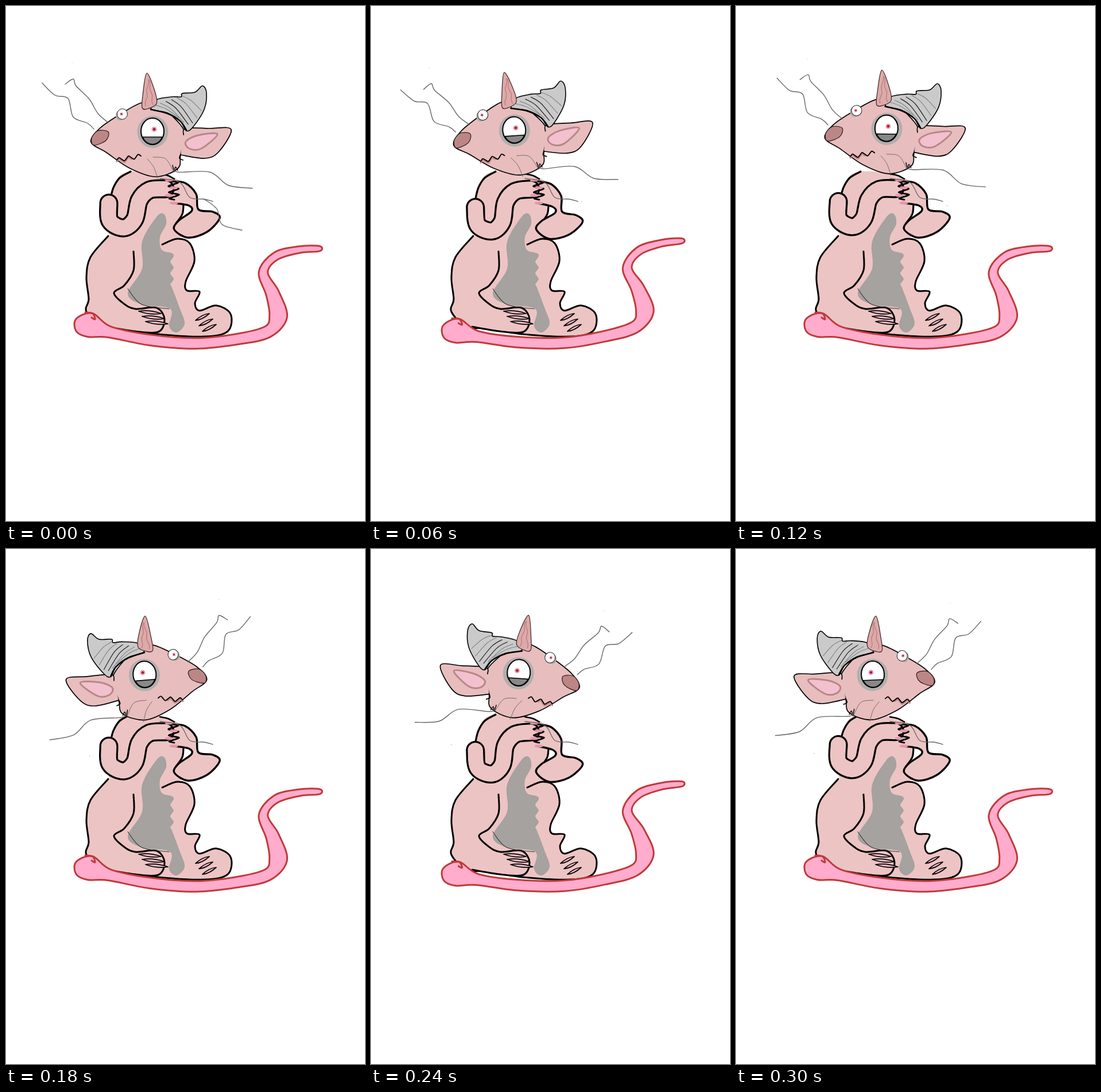
Animation, 625 px wide and 896 px high, one loop 360 ms. Source, as an HTML page with a canvas:

```html
<!DOCTYPE html>
<html lang="en">
<head>
<meta charset="utf-8">
<title>Nervous rat</title>
<style>
html, body { margin: 0; width: 100%; height: 100%; overflow: hidden; background: #fff; }
canvas { display: block; }
</style>
</head>
<body>
<canvas id="stage" width="625" height="896"></canvas>
<script>
const ctx = document.getElementById('stage').getContext('2d');
const SKIN = '#edc4c4', FACE = '#e8bdbd', INK = '#000', HAIR = '#666', GREY = '#888';
const STEP = 60;
const EYE = { x: 258, y: 214.5 };

// Where the eye sits and how far the head turns, facing left three times, then right
const HEADS = [
  [258, 214.5, 0], [252, 212, -4.2], [265, 209.3, 1],
  [238, 215, -5], [254.5, 211.5, 4.1], [235, 214.7, -2.5]
];

// The body repeats every three steps (degrees)
const BODIES = [
  { left: 0, right: 0, tail: 0 },
  { left: -4, right: 5, tail: -3.4 },
  { left: 1.5, right: 0, tail: 0 }
];

const mix = (a, b, u) => a + (b - a) * u;

// Smooth curve through a run of x,y pairs
function curve(pts, closed) {
  const n = pts.length / 2;
  const at = i => {
    i = closed ? (i + n) % n : Math.max(0, Math.min(n - 1, i));
    return [pts[2 * i], pts[2 * i + 1]];
  };
  ctx.beginPath();
  ctx.moveTo(pts[0], pts[1]);
  for (let i = 0; i < (closed ? n : n - 1); i++) {
    const [a, b, c, d] = [at(i - 1), at(i), at(i + 1), at(i + 2)];
    ctx.bezierCurveTo(b[0] + (c[0] - a[0]) / 6, b[1] + (c[1] - a[1]) / 6,
      c[0] - (d[0] - b[0]) / 6, c[1] - (d[1] - b[1]) / 6, c[0], c[1]);
  }
  if (closed) ctx.closePath();
}

function paint(fill, ink, width) {
  if (fill) { ctx.fillStyle = fill; ctx.fill(); }
  if (ink) { ctx.strokeStyle = ink; ctx.lineWidth = width; ctx.stroke(); }
}

function shape(pts, fill, ink, width) { curve(pts, true); paint(fill, ink, width); }
function open(pts, fill, ink, width) { curve(pts, false); paint(fill, ink, width); }
function line(pts, ink, width) { open(pts, null, ink, width); }

function oval(x, y, rx, ry, fill, ink, width) {
  ctx.beginPath();
  ctx.ellipse(x, y, rx, ry, 0, 0, 7);
  paint(fill, ink, width);
}

// Points of a sine ripple laid along a straight line
function ripple(x1, y1, x2, y2, amp, waves) {
  const pts = [], steps = Math.ceil(waves * 4);
  const len = Math.hypot(x2 - x1, y2 - y1);
  for (let i = 0; i <= steps; i++) {
    const u = i / steps, off = amp * Math.sin(2 * Math.PI * waves * u) / len;
    pts.push(mix(x1, x2, u) + (y2 - y1) * off, mix(y1, y2, u) - (x2 - x1) * off);
  }
  return pts;
}

// Closed outline around a spine; half(i, u) is the half width at each point
function tube(spine, half) {
  const n = spine.length / 2, near = [], far = [];
  for (let i = 0; i < n; i++) {
    const a = 2 * Math.max(0, i - 1), b = 2 * Math.min(n - 1, i + 1);
    const dx = spine[b] - spine[a], dy = spine[b + 1] - spine[a + 1];
    const k = half(i, i / (n - 1)) / Math.hypot(dx, dy);
    const x = spine[2 * i], y = spine[2 * i + 1];
    near.push(x + dy * k, y - dx * k);
    far.unshift(x - dy * k, y + dx * k);
  }
  return near.concat(far);
}

function toes(x, y, length, rise, dx, dy) {
  for (let i = 0; i < 3; i++) {
    const x1 = x + i * dx, y1 = y + i * dy, x2 = x1 + length, y2 = y1 + rise;
    const mx = (x1 + x2) / 2, my = (y1 + y2) / 2;
    ctx.beginPath();
    ctx.moveTo(x1, y1);
    ctx.quadraticCurveTo(mx, my - 5, x2, y2);
    ctx.quadraticCurveTo(mx, my + 5, x1, y1);
    paint('#f3bccb', INK, 1.7);
  }
}

function turned(x, y, deg, draw) {
  ctx.save();
  ctx.translate(x, y);
  ctx.rotate(deg * Math.PI / 180);
  ctx.translate(-x, -y);
  draw();
  ctx.restore();
}

function body() {
  shape([217, 288, 188, 315, 180, 398, 240, 425, 300, 408, 307, 362, 300, 303], SKIN);
  open([178, 400, 147, 437, 140, 472, 144, 510, 140, 532, 168, 561, 195, 560, 265, 571,
    345, 575, 386, 566, 391, 536, 366, 521, 337, 530, 329, 517, 337, 497, 315, 495,
    313, 479, 328, 444, 320, 413, 298, 405, 272, 415], SKIN, INK, 3);
  line([217, 288, 198, 299, 187, 316, 182, 335], INK, 3.2);
  line([309, 345, 307, 362, 296, 378], INK, 3.2);
  line([268, 292, 282, 295, 293, 301], INK, 2.6);
  open([222, 427, 222, 460, 206, 486, 188, 499, 204, 517, 225, 527, 262, 525, 276, 545,
    265, 567, 225, 566, 176, 558], SKIN, INK, 3);

  shape([275, 362, 279, 379, 268, 402, 271, 424, ...ripple(289, 430, 289, 490, 3, 3),
    303, 527, 311, 553, 297, 568, 284, 557, 286, 527, 236, 519, 212, 500, 237, 457,
    237, 410, 262, 367], '#a5a29f');
  line([212, 492, 236, 519, 284, 527], '#333', 1.1);

  toes(231, 531, 39, 4, 6, 9);
  toes(330, 547, 24, -12, 6, 9.5);
}

function tail() {
  const bump = (i, at, size, spread) => size * Math.exp(-(((i - at) / spread) ** 2));
  const half = (i, u) => 9.3 - 5 * u ** 4 + bump(i, 0.9, 12, 0.6) + bump(i, 7.2, 7, 0.9);
  const spine = [122, 555, 146, 555, 180, 567, 250, 581, 330, 587, 400, 580, 455, 567,
    474, 540, 464, 500, 448, 463, 470, 435, 510, 424, 546, 422];
  shape(tube(spine, half), '#ffaccd', '#c03a3a', 3);
  line([138, 533, 151, 535, 155, 545, 149, 542], '#c03a3a', 3);
}

// A limb of even thickness is one fat stroke on another
function leftArm() {
  const spine = [277, 318, 250, 320, 232, 338, 224, 371, 205, 386, 181, 374, 179, 343];
  line(spine, INK, 33);
  line(spine, SKIN, 26.5);
}

function rightArm() {
  open([288, 305, 312, 308, 331, 327, 335, 354, 360, 358, 372, 369, 350, 393, 317, 403,
    293, 389, 300, 374, 323, 357, 318, 347, 292, 343], SKIN, INK, 3.4);
}

function hands() {
  line(ripple(291, 305, 293, 337, 9, 3), INK, 2.8);
  for (let i = 0; i < 4; i++) oval(284 + 8 * (i % 2), 303 + 13.3 * i, 7.5, 2.6, '#e497ad');
}

function hat() {
  shape([262, 163, 289, 158, 305, 158, 307, 152, 329, 150, 342, 139, 349, 151, 345, 180,
    326, 210, 314, 217, 303, 200, 281, 186, 253, 179], '#cacaca', INK, 1.6);
  line([252, 180, 281, 187, 303, 200, 314, 216], INK, 2.6);
  for (let i = 0; i < 6; i++) {
    const u = i / 5, fold = i === 2 || i === 3;
    const x1 = mix(259, 308, u), y1 = mix(172, 157, u), x2 = mix(302, 340, u);
    const y2 = mix(195, 182, u) + 17 * Math.sin(Math.PI * u);
    line([x1, y1, mix(x1, x2, 0.45), mix(y1, y2, 0.3), x2, y2], fold ? '#222' : GREY, 1.2);
  }
}

function ear() {
  open([309, 224, 313, 213, 355, 213, 392, 215, 370, 254, 346, 265, 304, 259], FACE, INK, 1.7);
  shape([368, 223, 334, 225, 313, 236, 319, 248, 340, 248], '#f3c0d0', '#b98787', 3);
}

function horn() {
  shape([237, 177, 238, 156, 245, 117, 259, 148, 262, 170, 246, 179], '#dda9a9', '#3a2525', 1.2);
  line(ripple(243, 174, 248, 128, 1.2, 2), '#b57676', 1.1);
  line(ripple(256, 172, 249, 128, 1.2, 2), '#b57676', 1.1);
}

function pupil(x, y, r) {
  oval(x, y, r, r, '#eba0b2');
  oval(x, y, r / 2, r / 2, '#a01838');
}

function eyes() {
  oval(199, 190, 8, 9, '#a9a9a9');
  oval(202.5, 188, 9, 9.2, '#fff', '#222', 1);
  pupil(201, 188, 2.8);

  oval(255.5, 219, 27, 28, '#b3aeae');
  oval(255, 218, 20, 23, '#fff', INK, 2);
  ctx.beginPath();
  ctx.ellipse(255, 218, 19, 22.5, 0, 0.46, Math.PI - 0.46);
  ctx.closePath();
  paint(GREY, INK, 1.6);
  pupil(EYE.x, EYE.y, 4.6);
}

function head() {
  shape([237, 168, 201, 187, 163, 213, 148, 237, 175, 255, 215, 282, 260, 297, 299, 283,
    304, 258, 312, 222, 290, 192, 262, 172], FACE, INK, 1.7);
  ear();
  line([304, 258, 302, 265, 308, 268], INK, 1.7);
  hat();
  horn();
  eyes();
  shape([160, 217, 178, 219, 174, 234, 153, 242, 149, 230], '#bd8686', '#2c1a1a', 1.2);
  const mouth = ripple(193, 268, 235, 261, 3.5, 2.5);
  line(mouth.slice(0, 14).map((v, i) => v + 2 * (i % 2)), '#c08888', 3.5);
  line(mouth, INK, 1.9);
  line([290, 277, 293, 288, 295, 280, 299, 286], INK, 1.4);
}

function whiskers() {
  line([63, 134, 85, 155, 108, 161, 117, 193, 142, 204, 153, 214], HAIR, 1.4);
  line([103, 136, 117, 127, 122, 139, 145, 162, 160, 187, 178, 203], HAIR, 1.4);
  line([293, 282, 300, 289, 355, 289, 387, 312, 429, 317], HAIR, 1.4);
  line([246, 266, 257, 280, 264, 300], HAIR, 0.9);
  line([256, 263, 278, 266, 292, 289], HAIR, 0.9);
  oval(115, 100, 0.6, 0.6, '#bbb');
  oval(363, 351, 0.6, 0.8, '#999');
}

function render(time) {
  const i = Math.floor(time / STEP) % HEADS.length;
  const [x, y, turn] = HEADS[i];
  const pose = BODIES[i % 3];
  const onHead = draw => {
    ctx.save();
    ctx.translate(x, y);
    ctx.rotate(turn * Math.PI / 180);
    ctx.scale(i < 3 ? 1 : -1, 1);
    ctx.translate(-EYE.x, -EYE.y);
    draw();
    ctx.restore();
  };

  ctx.fillStyle = '#fff';
  ctx.fillRect(0, 0, 625, 896);
  ctx.lineCap = ctx.lineJoin = 'round';
  body();
  turned(317, 490, pose.tail, tail);
  onHead(head);
  turned(290, 330, pose.right, rightArm);
  turned(285, 308, pose.left, leftArm);
  hands();
  line([268, 300, 303, 307, 320, 333, 345, 336, 360, 340], HAIR, 1.3);
  if (i === 0) line([345, 336, 367, 353, 376, 380, 411, 390], HAIR, 1.3);
  onHead(whiskers);
}

const start = performance.now();
function tick() {
  render(performance.now() - start);
  requestAnimationFrame(tick);
}
tick();
</script>
</body>
</html>
```
